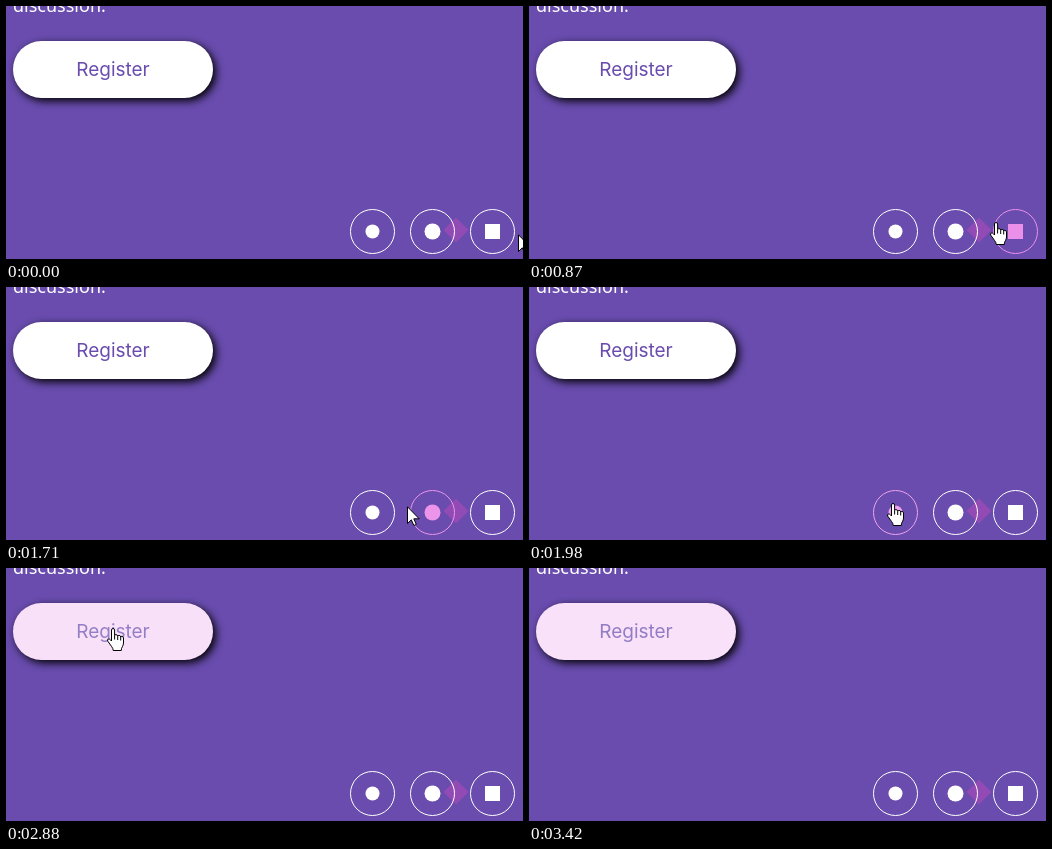
Recreate the animation shown at these times as an HTML page. Size 517 px wide and 253 px high, loop 3.49 s.

```html
<!DOCTYPE html>
<html lang="en">
<head>
<meta charset="utf-8">
<title>Hover states</title>
<style>
  html, body { margin: 0; width: 100%; height: 100%; overflow: hidden; background: #694cae; }
  #stage { position: relative; width: 517px; height: 253px; overflow: hidden; }
  #button {
    position: absolute; left: 7px; top: 35px; width: 200px; height: 57px;
    border-radius: 28.5px; box-shadow: 3px 3px 8px #000;
    font: 19px/57px Inter, sans-serif; text-align: center;
  }
  svg { position: absolute; left: 0; top: 0; display: block; }
</style>
</head>
<body>
<div id="stage">
  <div id="button">Register</div>
  <svg width="517" height="253" viewBox="0 0 517 253">
    <text x="7" y="6" font-family="Noto Sans, Open Sans, sans-serif" font-size="18" fill="#fff">discussion.</text>
    <path d="M437.5 224L450 211.5L462.5 224L450 236.5Z" fill="#924ab4"/>
    <g id="left">
      <circle cx="366.5" cy="225.5" r="22" fill="none"/>
      <circle cx="366.5" cy="225.5" r="7" stroke="none"/>
    </g>
    <g id="middle">
      <circle cx="426.5" cy="225.5" r="22" fill="none"/>
      <circle cx="426.5" cy="225.5" r="8" stroke="none"/>
    </g>
    <g id="right">
      <circle cx="486.5" cy="225.5" r="22" fill="none"/>
      <rect x="479" y="218" width="15" height="15" stroke="none"/>
    </g>
    <g id="cursor" fill="#fff" stroke="#000" stroke-linejoin="round">
      <path id="arrow" d="M.5 .8V17.5L4.3 13.8L6.9 19.5L9.3 18.4L6.8 12.8H12.2Z"/>
      <g id="hand">
        <path d="M-1.5 13V2Q-1.5 .5 0 .5T1.6 2V7.5Q1.8 6.6 3.1 6.6T4.7 8.2Q5 7.4 6.2 7.4T7.7 9Q8 8.3 9 8.3T10.5 10V15Q10.5 17 9.3 18.8T8.3 22.5H.2Q.2 20.5 -1.3 18.7L-5.2 13.2Q-6 11.8 -4.9 11.1T-2.6 11.8Z"/>
        <path d="M1.6 7.5V11.5M4.7 8.2V12M7.7 9V12.5" fill="none"/>
      </g>
    </g>
  </svg>
</div>
<script>
const LOOP = 3490, STEP = 66, FADE = 300;
const WHITE = [255, 255, 255], PINK = [234, 144, 233], PURPLE = [105, 76, 174];
const ENTRY = { x: 512, y: 228 };

// Pointer moves; power shapes the slowdown, bend lifts the path into an arc.
const moves = [
  { start: 70, steps: 6, x: 478, y: 220, power: 2, bend: 0 },
  { start: 870, steps: 8, x: 433, y: 221, power: 2, bend: 7 },
  { start: 1640, steps: 8, x: 359, y: 216, power: 2, bend: 0 },
  { start: 2320, steps: 7, x: 95, y: 17, power: 2, bend: 0 },
  { start: 2810, steps: 2, x: 107, y: 60, power: 2, bend: 0 },
  { start: 3210, steps: 2, x: 155, y: 330, power: 1, bend: 0 }
];

const hovers = {
  right: { on: 140, off: 930 },
  middle: { on: 1020, off: 1700 },
  left: { on: 1790, off: 2310 },
  button: { on: 2830, off: 3265 }
};

const $ = id => document.getElementById(id);
const clamp = v => Math.min(1, Math.max(0, v));
const easeOut = (p, power) => 1 - (1 - p) ** power;
const lerp = (a, b, k) => a + (b - a) * k;
const mix = (a, b, k) => `rgb(${a.map((v, i) => Math.round(lerp(v, b[i], k)))})`;

const fade = ms => easeOut(clamp(ms / FADE), 2);
const level = (id, t) => fade(t - hovers[id].on) - fade(t - hovers[id].off);

// Time advances in even steps, counted from the latest move.
function snap(t) {
  const origin = moves.reduce((last, m) => m.start <= t ? m.start : last, 0);
  return origin + Math.floor((t - origin) / STEP) * STEP;
}

function pointerAt(t) {
  let { x, y } = ENTRY;
  for (const m of moves) {
    if (t < m.start) break;
    const e = easeOut(clamp(((t - m.start) / STEP + 1) / m.steps), m.power);
    x = lerp(x, m.x, e);
    y = lerp(y, m.y, e) - m.bend * Math.sin(Math.PI * e);
  }
  return { x: Math.round(x), y: Math.round(y) };
}

const inRing = (x, y) => [366.5, 426.5, 486.5].some(cx => Math.hypot(x - cx, y - 225.5) < 22.5);
const onButton = (x, y) => x > 7 && x < 207 && y > 35 && y < 92;

function render(time) {
  const t = snap(time);
  for (const id of ["left", "middle", "right"]) {
    const color = mix(WHITE, PINK, level(id, t));
    $(id).setAttribute("stroke", color);
    $(id).setAttribute("fill", color);
  }
  const pressed = level("button", t);
  $("button").style.background = mix(WHITE, PINK, pressed);
  $("button").style.color = mix(PURPLE, WHITE, pressed);

  const { x, y } = pointerAt(t);
  const linked = inRing(x, y) || onButton(x, y);
  $("cursor").setAttribute("transform", `translate(${x} ${y})`);
  $("hand").setAttribute("visibility", linked ? "visible" : "hidden");
  $("arrow").setAttribute("visibility", linked ? "hidden" : "visible");
}

const start = performance.now();
function tick(now) {
  render(Math.max(0, now - start) % LOOP);
  requestAnimationFrame(tick);
}
render(0);
requestAnimationFrame(tick);
</script>
</body>
</html>
```
